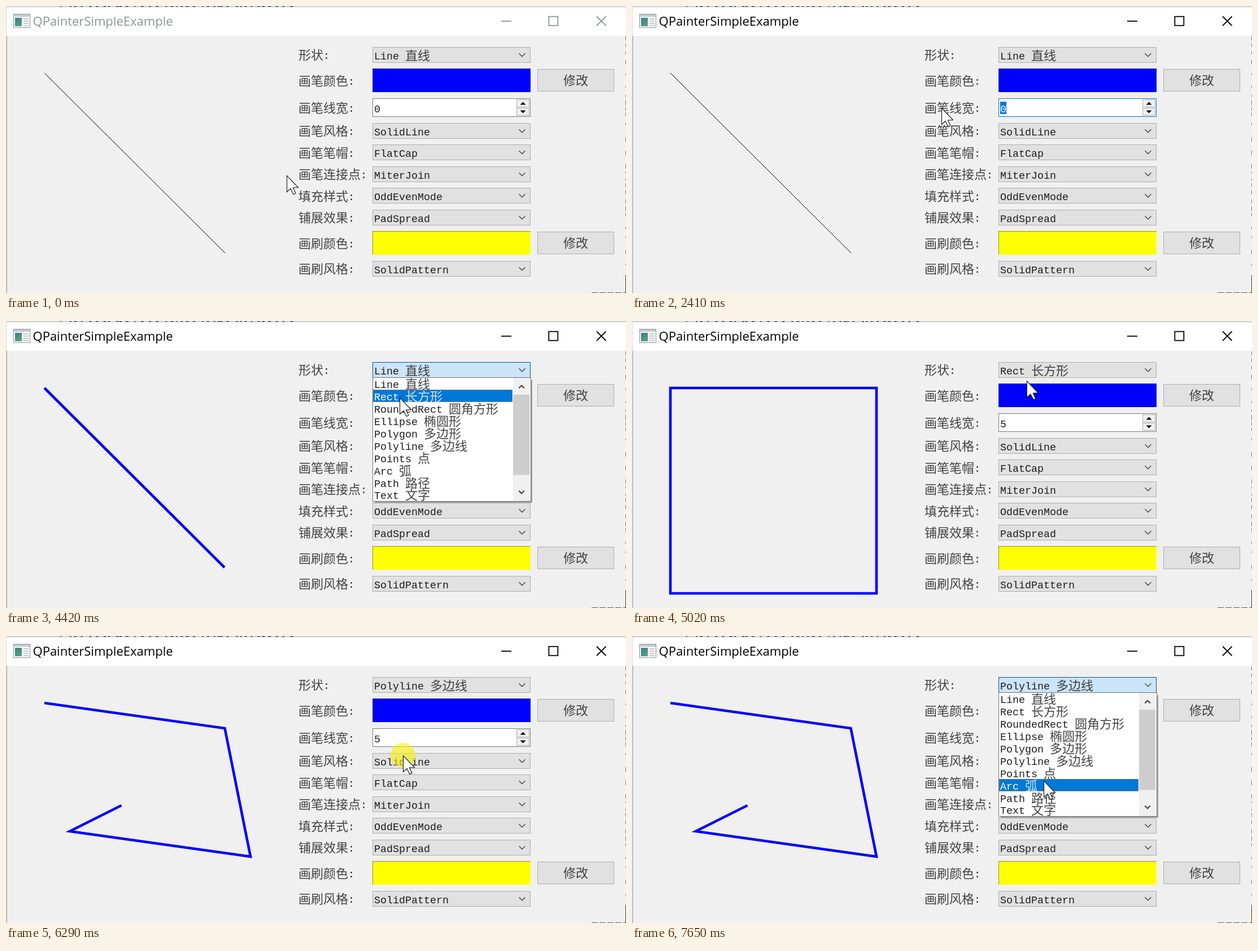
These frames come from a looping animation (1098 by 510 pixels, 8000 ms). An HTML page with a canvas:

```html
<!DOCTYPE html>
<html lang="zh-CN">
<head>
<meta charset="utf-8">
<title>QPainterSimpleExample</title>
<style>
  html, body { margin: 0; width: 100%; height: 100%; overflow: hidden; background: #f0f0f0; }
  canvas { display: block; }
</style>
</head>
<body>
<canvas id="stage" width="1098" height="510"></canvas>
<script>
const ctx = document.getElementById('stage').getContext('2d');
const LOOP = 8000;
const STEP = 201; // the screen refreshes about five times a second
const ACCENT = '#0078d7';
const INK = '#1c1c1c';
const LEFT = 649, FIELD = 280, ROW = 21.9, GAP = 10.5;

const SHAPES = ['Line 直线', 'Rect 长方形', 'RoundedRect 圆角方形', 'Ellipse 椭圆形', 'Polygon 多边形',
  'Polyline 多边线', 'Points 点', 'Arc 弧', 'Path 路径', 'Text 文字'];

// Form rows from top to bottom; a string value is a plain drop-down
const FORM = [
  { label: '形状', draw: shapeCombo },
  { label: '画笔颜色', height: 42, draw: (y) => swatch(y, '#00f') },
  { label: '画笔线宽', height: 33.5, draw: spinBox },
  { label: '画笔风格', value: 'SolidLine' },
  { label: '画笔笔帽', value: 'FlatCap' },
  { label: '画笔连接点', value: 'MiterJoin' },
  { label: '填充样式', value: 'OddEvenMode' },
  { label: '铺展效果', value: 'PadSpread' },
  { label: '画刷颜色', height: 42, draw: (y) => swatch(y, '#ff0') },
  { label: '画刷风格', value: 'SolidPattern' }
];

// Each move starts where the one before it ended
const START = { x: 497, y: 301 };
const MOVES = [
  { from: 0, to: 800, x: 676, y: 181 },
  { from: 800, to: 1200, x: 548, y: 181 },
  { from: 3000, to: 3800, x: 683, y: 86 },
  { from: 4010, to: 4400, x: 697, y: 136 },
  { from: 4800, to: 5200, x: 700, y: 86 },
  { from: 5410, to: 5800, x: 703, y: 212 },
  { from: 6290, to: 6820, x: 717, y: 88 },
  { from: 7040, to: 7500, x: 729, y: 257 }
];
const CLICKS = [800, 4010, 4610, 5210, 6280, 6830];

// hidden: how much of the list is still rolled up while it slides open
const POPUPS = [
  { slide: 3810, full: 4010, close: 4810, hidden: 118 },
  { slide: 5210, full: 5410, close: 6280, hidden: 130 },
  { slide: 6830, full: 7040, close: LOOP, hidden: 139 }
];

const ease = (u) => u * u * (3 - 2 * u);

function pointerAt(t) {
  const now = Math.floor((t + 10) / STEP) * STEP;
  let { x, y } = START;
  for (const move of MOVES) {
    const u = ease(Math.min(1, Math.max(0, (now - move.from) / (move.to - move.from))));
    x += (move.x - x) * u;
    y += (move.y - y) * u;
  }
  return { x, y, pressed: CLICKS.some(at => t >= at && t < at + STEP) };
}

function fill(x, y, w, h, color) {
  ctx.fillStyle = color;
  ctx.fillRect(x, y, w, h);
}

function box(x, y, w, h, color, border) {
  fill(x, y, w, h, border);
  fill(x + 1, y + 1, w - 2, h - 2, color);
}

function trace(points, closed) {
  ctx.beginPath();
  points.forEach(([x, y]) => ctx.lineTo(x, y));
  if (closed) ctx.closePath();
}

function stroke(points, color, width, closed) {
  trace(points, closed);
  ctx.strokeStyle = color;
  ctx.lineWidth = width;
  ctx.stroke();
}

function polygon(points, color) {
  trace(points, true);
  ctx.fillStyle = color;
  ctx.fill();
}

// Latin letters take half the cell of a Chinese character
function text(str, x, middle, color = INK) {
  ctx.fillStyle = color;
  for (const run of str.match(/[\x20-\x7e]+|[^\x20-\x7e]+/g)) {
    const latin = run.charCodeAt(0) < 128;
    ctx.font = latin ? '18.33px "Liberation Mono", monospace' : '300 22px "Noto Sans CJK SC", "Noto Sans CJK", sans-serif';
    ctx.globalAlpha = latin ? 1 : 0.82;
    ctx.fillText(run, x, middle + (latin ? 7 : 8));
    x += run.length * (latin ? 11 : 22);
  }
  ctx.globalAlpha = 1;
}

function chevron(x, y, half, color, width, dir = 1) {
  stroke([[x - half, y - dir * half / 2], [x, y + dir * half / 2], [x + half, y - dir * half / 2]], color, width);
}

function triangle(x, y, dir) {
  polygon([[x - 5, y - dir * 2.5], [x, y + dir * 2.5], [x + 5, y - dir * 2.5]], '#000');
}

function combo(y, label, color = '#e1e1e1', border = '#adadad') {
  box(LEFT, y, FIELD, 28, color, border);
  text(label, LEFT + 3, y + 14.5);
  chevron(914, y + 14, 5.5, '#444', 1.4);
}

function swatch(y, color) {
  fill(LEFT, y, FIELD, 42, color);
  fill(LEFT, y, FIELD, 1, 'rgba(70, 70, 70, .6)');
  fill(LEFT, y, 1, 42, 'rgba(70, 70, 70, .6)');
  box(941, y + 1, 136, 40, '#e1e1e1', '#adadad');
  text('修改', 987, y + 21);
}

function shapeCombo(y, state) {
  const { t, popup, mouse } = state;
  const hover = mouse.x >= LEFT && mouse.x < LEFT + FIELD && mouse.y >= y && mouse.y < y + 28;
  let look = [];
  if (popup && t >= popup.full + 2 * STEP - 10) look = ['#cce4f7', '#005499'];
  else if (popup && t >= popup.full) look = ['#d8eaf9', '#0066b8'];
  else if (popup || hover) look = ['#e5f1fb', ACCENT];
  combo(y, SHAPES[state.shape], ...look);
}

function spinBox(y, { t }) {
  const focused = t >= 800 && t < 3810;
  const selected = t >= 1000 && t < 2800;
  box(LEFT, y, FIELD, 33, '#fff', focused ? ACCENT : '#7a7a7a');
  if (selected) fill(652, y + 6, 11, 22, ACCENT);
  text(t < 2800 ? '0' : '5', 652, y + 17.5, selected ? '#fff' : INK);
  for (const [top, dir] of [[y + 2, -1], [y + 17, 1]]) {
    box(904, top, 23, 14, '#f0f0f0', '#ababab');
    triangle(915.5, top + 7, dir);
  }
}

function fringe() {
  let seed = 7;
  const random = () => (seed = seed * 16807 % 2147483647) / 2147483647;
  fill(0, 0, 1098, 1, '#e8e8ea');
  fill(0, 1, 1098, 1, '#b4b4b6');
  for (let x = 96; x < 512; x += 5 + random() * 13) fill(x, 0, 2 + random() * 3, 1.5, '#3a4468');
  for (let y = 54; y < 470; y += 8 + random() * 18) fill(1097, y, 1, 3 + random() * 6, '#777');
  for (let x = 1037; x < 1096; x += 14) fill(x, 509, 11, 1, '#555');
  fill(0, 0, 1, 510, '#d8d8d8');
  fill(1, 53, 1, 457, '#a6a6a6');
  fill(1097, 478, 1, 32, '#333');
}

function titleBar(active) {
  const color = active ? '#000' : '#8d9494';
  fill(0, 0, 1098, 53, '#fff');
  box(13, 14, 30, 25, '#f7f7f7', '#8d9698');
  fill(14, 15, 28, 4, '#c3cbce');
  const screen = ctx.createLinearGradient(16, 21, 27, 36);
  screen.addColorStop(0, '#357f94');
  screen.addColorStop(1, '#5aa477');
  fill(16, 21, 12, 15, screen);
  for (let y = 22; y < 36; y += 4) fill(31, y, 9, 1.5, '#b9bec0');
  ctx.font = '22px "Open Sans", sans-serif';
  ctx.fillStyle = color;
  ctx.fillText('QPainterSimpleExample', 47.5, 35);
  fill(877, 26, 18, 1.8, color);
  ctx.strokeStyle = color;
  ctx.lineWidth = 1.8;
  ctx.strokeRect(961.3, 18.7, 16, 16);
  stroke([[1046, 18.5], [1062.5, 35]], color, 1.8);
  stroke([[1062.5, 18.5], [1046, 35]], color, 1.8);
}

function drawing({ t, shape }) {
  const width = 4.6;
  if (t < 2800) stroke([[68, 119], [388, 439]], '#000', 1);
  else if (shape === 0) stroke([[68, 119], [387, 438]], '#00f', width);
  else if (shape === 1) stroke([[68, 119], [433, 119], [433, 484], [68, 484]], '#00f', width, true);
  else stroke([[68, 119], [387.5, 164], [433, 392], [113, 347], [204.5, 301]], '#00f', width);
}

function popupList(hidden, current) {
  if (!hidden) {
    fill(653, 321, 279, 2, '#a2a2a2');
    fill(930, 105, 2, 218, '#a2a2a2');
  }
  ctx.save();
  ctx.beginPath();
  ctx.rect(LEFT, 100, 281, 221 - hidden);
  ctx.clip();
  ctx.translate(0, -hidden);
  box(LEFT, 100, 281, 221, '#fff', '#707070');
  fill(898, 101, 30, 219, '#f0f0f0');
  fill(898, 131, 29, 142.5, '#cdcdcd');
  chevron(913, 117, 4.8, '#505050', 2.3, -1);
  chevron(913, 304, 4.8, '#505050', 2.3);
  SHAPES.forEach((name, i) => {
    const top = 101 + i * ROW;
    if (i === current) box(650, Math.floor(top), 247, 22, ACCENT, '#5f7f96');
    text(name, 652, top + 11.3, i === current ? '#fff' : INK);
  });
  ctx.restore();
}

function pointer({ x, y, pressed }) {
  if (pressed) {
    ctx.beginPath();
    ctx.arc(x, y, 22, 0, 2 * Math.PI);
    ctx.fillStyle = 'rgba(250, 238, 0, .6)';
    ctx.fill();
  }
  ctx.save();
  ctx.translate(x, y);
  const arrow = [[0.5, 0.5], [0.5, 29.5], [7, 23.5], [12, 33.5], [16, 31.8], [11.5, 22], [20.5, 21.5]];
  polygon(arrow, '#fff');
  stroke(arrow, '#111', 1.1, true);
  ctx.restore();
}

function form(state) {
  let top = 73;
  for (const { label, height = 28, value, draw } of FORM) {
    const y = Math.floor(top);
    text(label + ':', 518, top + height / 2);
    if (draw) draw(y, state);
    else combo(y, value);
    top += height + GAP;
  }
}

function render(t) {
  const mouse = pointerAt(t);
  const popup = POPUPS.find(p => t >= p.slide && t < p.close);
  const shape = t < 4810 ? 0 : t < 6280 ? 1 : 5;
  const state = { t, mouse, popup, shape };

  fill(0, 0, 1098, 510, '#f0f0f0');
  titleBar(t >= 800);
  fringe();
  drawing(state);
  form(state);
  if (popup) {
    const sliding = t < popup.full;
    const current = !sliding && mouse.y > 101 ? Math.floor((mouse.y - 101) / ROW) : shape;
    popupList(sliding ? popup.hidden : 0, current);
  }
  pointer(mouse);
}

function tick() {
  render(performance.now() % LOOP);
  requestAnimationFrame(tick);
}
tick();
</script>
</body>
</html>
```
